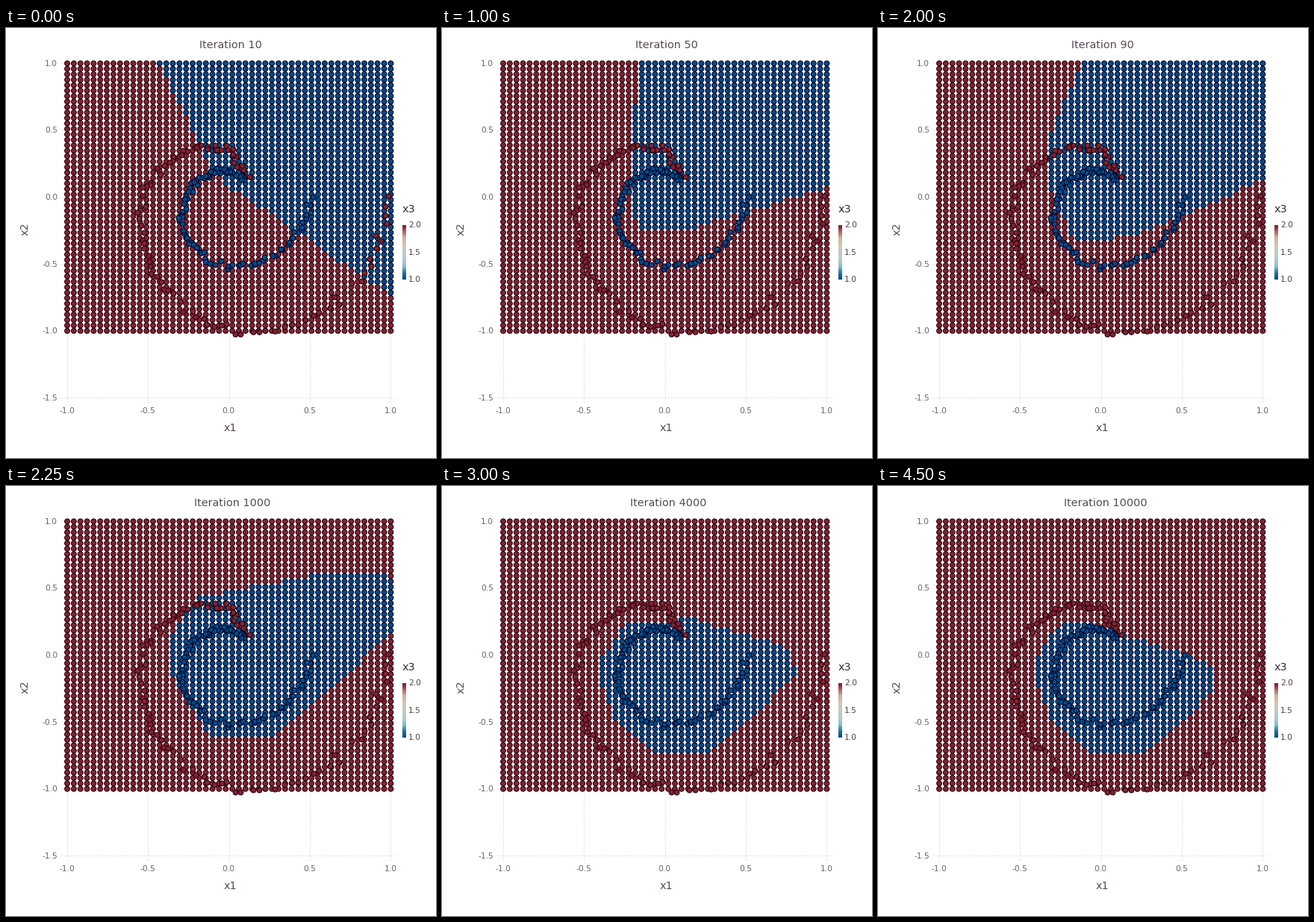
Recreate the animation shown at these times as a matplotlib script. Size 576 by 576 pixels, loop 4750 ms.

```python
import numpy as np
import matplotlib.pyplot as plt
from matplotlib.animation import FuncAnimation
from matplotlib.colors import LinearSegmentedColormap
from matplotlib.path import Path

SIZE = 576
LEFT, RIGHT, UPPER, LOWER = 82, 515.4, 47.4, 405.7
BLUE, BLUE_EDGE = "#004d86", "#00042c"
RED, RED_EDGE = "#7f2433", "#30020c"
TITLES = [10 * k for k in range(1, 10)] + [1000 * k for k in range(1, 11)]

# Corners of the blue region in pixels: down the left, along the bottom, back up.
TOP = [(523, 40), (400, 40)]
SLOPE = [(200, 40), (240, 116), (262, 158), (272, 185), (300, 215),
         (345, 243), (523, 364)] + TOP
CORNER = [(255, 40), (258, 100), (272, 150), (276, 215), (281, 255.5),
          (376, 244), (523, 241)] + TOP
NOTCH = [(268, 40), (254, 140), (254, 200), (254, 249), (270, 271),
         (326, 271), (523, 212)] + TOP
BULGE = [(274, 40), (229, 150), (228, 180), (228, 212), (263, 285),
         (345, 279), (523, 200)] + TOP
TAIL = [(250, 194), (210, 232), (210, 263), (242, 310), (274, 358),
        (362, 358), (524, 190), (510, 145), (446, 147)]
EGG = [(244, 182), (210, 236), (211, 257), (230, 314), (290, 358),
       (357, 358), (457, 277), (452, 240), (300, 187.5)]
FINAL = np.minimum(EGG, (449, SIZE))

# Step, easing power towards the next outline, outline.
KEYS = [(0, 0.5, SLOPE), (2, 0.5, CORNER), (4, 1, NOTCH), (8, 0.5, BULGE),
        (10, 0.4, TAIL), (14, 3, EGG), (18, 1, FINAL)]

# Arm radius in pixels at every 45 degrees from 45 to 360.
RED_RADII = [32, 60, 86, 113, 141, 178, 201, 214]
BLUE_RADII = [31, 34, 42, 57, 79, 93, 100, 109]


def outline(step):
    for (a, power, pa), (b, _, pb) in zip(KEYS, KEYS[1:]):
        if a <= step <= b:
            u = ((step - a) / (b - a)) ** power
            return np.array(pa) * (1 - u) + np.array(pb) * u


def spiral(radii, seed, count=97, noise=3):
    rng = np.random.default_rng(seed)
    angle = np.linspace(50, 360, count)
    radius = np.interp(angle, np.linspace(45, 360, len(radii)), radii)
    angle = np.radians(angle)
    x = (LEFT + RIGHT) / 2 + radius * np.cos(angle)
    y = (UPPER + LOWER) / 2 - radius * np.sin(angle)
    return np.column_stack([x, y]) + rng.normal(0, noise, (count, 2))


def dots(pts, face, edge):
    return ax.scatter(pts[:, 0], pts[:, 1], s=6.8 ** 2, c=face, edgecolors=edge,
                      linewidths=1.13, zorder=3)


def label(x, y, text, size=10.6, color="#6c606b", ha="center"):
    return ax.text(x, y, text, fontsize=size, color=color, ha=ha,
                   va="baseline", family="DejaVu Sans")


fig = plt.figure(figsize=(8, 8), dpi=72, facecolor="white")
ax = fig.add_axes([0, 0, 1, 1])
ax.axis("off")

# Colour key
ramp = LinearSegmentedColormap.from_list("ramp", [
    (0, BLUE), (0.1, "#1b7098"), (0.22, "#7fb9c6"), (0.32, "#abcbcd"),
    (0.5, "#bfcdc4"), (0.65, "#cfc8b2"), (0.78, "#cdb196"), (0.88, "#b26a6a"),
    (0.95, "#913446"), (1, RED)])
ax.imshow(np.linspace(1, 0, 40)[:, None], cmap=ramp, extent=(531, 536, 337, 264),
          aspect="auto", interpolation="nearest")
ax.set_xlim(0, SIZE)
ax.set_ylim(SIZE, 0)
label(531, 247, "x3", 14.4, "#362a35", "left")
for i in range(3):
    label(539, 267 + 36.5 * i, f"{2 - 0.5 * i:.1f}", color="#4c404b", ha="left")

# Axes
grid_style = dict(color="#d0d0e0", lw=0.76, dashes=(2.5, 2.5), zorder=1)
for i in range(5):
    x = LEFT + (RIGHT - LEFT) / 4 * i
    ax.plot([x, x], [39.5, 503], **grid_style)
    label(x - 0.5, 516, f"{-1 + 0.5 * i:.1f}")
for i in range(6):
    y = UPPER + (LOWER - UPPER) / 4 * i
    ax.plot([74, 523], [y, y], **grid_style)
    label(69.3, y + 3.4, f"{1 - 0.5 * i:.1f}", ha="right")
label(300.5, 540, "x1", 14.4, "#564a55")
ax.text(25.3, 269.5, "x2", fontsize=14.4, color="#564a55", rotation=90,
        ha="center", va="center", family="DejaVu Sans")
title = label(0, 26.7, "", 14.4, "#564a55", "left")

# Points
gx, gy = np.meshgrid(np.linspace(LEFT, RIGHT, 50), np.linspace(UPPER, LOWER, 50),
                     indexing="ij")
grid = np.column_stack([gx.ravel(), gy.ravel()])
field = dots(grid, RED, RED_EDGE)
dots(spiral(RED_RADII, 4), RED, RED_EDGE)
dots(spiral(BLUE_RADII, 7), BLUE, BLUE_EDGE)


def update(step):
    inside = Path(outline(step)).contains_points(grid)
    field.set_facecolor(np.where(inside, BLUE, RED))
    field.set_edgecolor(np.where(inside, BLUE_EDGE, RED_EDGE))
    text = f"Iteration {TITLES[step]}"
    title.set_text(text)
    title.set_x(298.5 - 3.33 * len(text))
    return field, title


anim = FuncAnimation(fig, update, frames=len(TITLES), interval=250,
                     init_func=lambda: update(0), repeat=True, repeat_delay=0)
plt.show()
```
